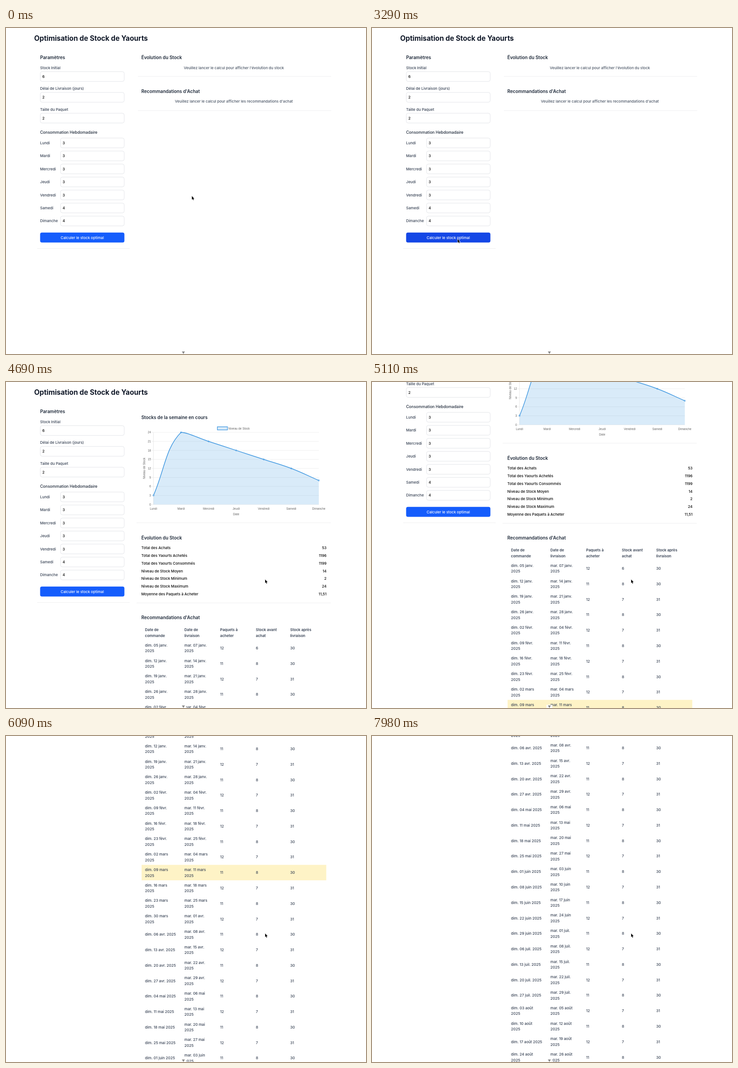
Recreate the animation shown at these times as an HTML page with a canvas. Size 786x712 px, loop 8 s.

```html
<!DOCTYPE html>
<html lang="fr">
<head>
<meta charset="utf-8">
<style>
html, body { margin: 0; width: 100%; height: 100%; overflow: hidden; background: #fff; }
canvas { display: block; }
</style>
</head>
<body>
<canvas id="stage" width="786" height="712"></canvas>
<script>
const ctx = document.getElementById('stage').getContext('2d');
const LOOP = 8000, STEP = 70, RESULT_AT = 3360, CHART_MS = 1000;
const DAYS = ['Lundi', 'Mardi', 'Mercredi', 'Jeudi', 'Vendredi', 'Samedi', 'Dimanche'];
const MONTHS = ['janv.', 'févr.', 'mars', 'avr.', 'mai', 'juin', 'juil.', 'août'];
const STOCK = [3, 24, 21, 18, 15, 12, 8];
const STATS = [
  ['Total des Achats', '53'], ['Total des Yaourts Achetés', '1196'],
  ['Total des Yaourts Consommés', '1199'], ['Niveau de Stock Moyen', '14'],
  ['Niveau de Stock Minimum', '2'], ['Niveau de Stock Maximum', '24'],
  ['Moyenne des Paquets à Acheter', '11,51']
];
const HEADERS = [
  [304, 'Date de', 'commande'], [390, 'Date de', 'livraison'], [468, 'Paquets à', 'acheter'],
  [546, 'Stock avant', 'achat'], [621, 'Stock après', 'livraison']
];
const BODY = 8.05, INK = '#364153', HEAD = '#1e2939', BLUE = '#4299e1', BLUE_FILL = 'rgba(66,153,225,.2)';
const LEFT = 74.5, RIGHT = 258.5;

// Keys are [time, value, slope]; cubic Hermite between them.
const CURSOR_X = [[70, 405.8], [840, 340], [1400, 340], [2520, 196], [2870, 196], [3010, 187], [3430, 187], [4690, 565.8]];
const CURSOR_Y = [[70, 367], [840, 350], [1400, 350], [2520, 459], [2870, 459], [3010, 461], [3430, 461], [4690, 431.3]];
const SCROLL = [[4900, 0, .7], [5460, 424.4, .36], [6090, 586.8, .15], [6860, 648], [7490, 648, .6], [7980, 994, .5]];

function track(keys, t) {
  if (t <= keys[0][0]) return keys[0][1];
  const i = keys.findIndex(k => k[0] >= t);
  if (i < 0) return keys[keys.length - 1][1];
  const [t0, a, m0 = 0] = keys[i - 1], [t1, b, m1 = 0] = keys[i];
  const d = t1 - t0, u = (t - t0) / d, v = 1 - u;
  // Flat stretches stay flat, whatever slope follows them.
  if (a === b) return a;
  return v * v * (1 + 2 * u) * a + u * u * (3 - 2 * u) * b + u * v * d * (v * m0 - u * m1);
}

// y is the middle of the capitals; for left-aligned text x is the edge of the ink.
function text(s, x, y, { size = BODY, weight = 450, color = INK, align = 'left', family = 'Inter' } = {}) {
  ctx.font = `${weight} ${size}px ${family}, sans-serif`;
  ctx.fillStyle = color;
  ctx.textAlign = align;
  ctx.fillText(s, align === 'left' ? x - size * .06 : x, y + size * .36);
}
const heading = (s, x, y) => text(s, x, y, { size: 9.9, weight: 600, color: HEAD });
const small = (s, x, y, align = 'center') =>
  text(s, x, y, { size: 6.4, weight: 400, color: '#666', align, family: 'Liberation Sans' });

function line(x0, y0, x1, y1, color) {
  ctx.strokeStyle = color;
  ctx.lineWidth = .7;
  ctx.beginPath();
  ctx.moveTo(x0, y0);
  ctx.lineTo(x1, y1);
  ctx.stroke();
}
const cardEdge = (x0, x1, y) => line(x0, y, x1, y, '#e9e9ea');

function box(x, y, w, h, fill, stroke) {
  ctx.beginPath();
  ctx.roundRect(x, y, w, h, 4);
  ctx.fillStyle = fill;
  ctx.fill();
  if (!stroke) return;
  ctx.strokeStyle = stroke;
  ctx.lineWidth = .8;
  ctx.stroke();
}
function field(x, y, value) {
  box(x + .4, y - 10.7, RIGHT - x - .8, 21.4, '#fff', '#dcdfe4');
  text(value, x + 5.3, y, { color: '#0a0a0a' });
}

function drawForm(hover) {
  text('Optimisation de Stock de Yaourts', 62.5, 22.5, { size: 15.3, weight: 650, color: '#101828' });
  heading('Paramètres', 75, 64.5);
  [['Stock Initial', 6], ['Délai de Livraison (jours)', 2], ['Taille du Paquet', 2]].forEach(([label, value], i) => {
    text(label, 75, 87 + i * 45.4);
    field(LEFT, 106 + i * 45.4, value);
  });
  text('Consommation Hebdomadaire', 75, 228, { size: 8.65, weight: 550, color: HEAD });
  DAYS.forEach((day, i) => {
    const y = 251 + i * 28.42;
    text(day, 75, y);
    field(118.7, y, i < 5 ? 3 : 4);
  });
  box(LEFT, 446.8, RIGHT - LEFT, 21.6, hover ? '#1447e6' : '#155dfc');
  text('Calculer le stock optimal', 166.5, 458, { weight: 500, color: '#fff', align: 'center' });
  cardEdge(68, 270, 481.5);
}

function drawEmpty() {
  const note = { color: '#4a5565', align: 'center' };
  heading('Évolution du Stock', 296, 64.5);
  text("Veuillez lancer le calcul pour afficher l'évolution du stock", 497.5, 87, note);
  cardEdge(288, 710, 105.8);
  heading("Recommandations d'Achat", 296, 138.5);
  text("Veuillez lancer le calcul pour afficher les recommandations d'achat", 497.5, 160.5, note);
  cardEdge(288, 710, 180.3);
}

function drawChart(progress) {
  const left = 322, right = 683, top = 110, base = 267.5, unit = (base - top) / 24;
  const points = STOCK.map((v, i) => ({ x: left + i * (right - left) / 6, y: base - v * unit * progress }));
  const clamp = y => Math.min(base, Math.max(top, y));

  heading('Stocks de la semaine en cours', 296, 77);
  ctx.fillStyle = BLUE_FILL;
  ctx.fillRect(461.5, 97.8, 22, 6.8);
  ctx.strokeStyle = BLUE;
  ctx.lineWidth = 1.3;
  ctx.strokeRect(461.5, 97.8, 22, 6.8);
  small('Niveau de Stock', 486, 101.3, 'left');

  for (let v = 0; v <= 24; v += 3) {
    const y = base - v * unit;
    line(left - 4, y, right, y, '#e8e8e8');
    small(v, 316.5, y, 'right');
  }
  line(left, top, left, base, '#dedede');
  points.forEach((p, i) => small(DAYS[i], p.x, 277));
  small('Date', 502.5, 288.3);
  ctx.save();
  ctx.translate(302, 188.5);
  ctx.rotate(-Math.PI / 2);
  small('Niveau de Stock', 0, 0);
  ctx.restore();

  // Cardinal spline with tension .4, weighted by chord length.
  const handles = points.map((p, i) => {
    const prev = points[i - 1] || p, next = points[i + 1] || p;
    const a = Math.hypot(p.x - prev.x, p.y - prev.y), b = Math.hypot(next.x - p.x, next.y - p.y);
    const k = .4 / (a + b), dx = next.x - prev.x, dy = next.y - prev.y;
    return [p.x - k * a * dx, clamp(p.y - k * a * dy), p.x + k * b * dx, clamp(p.y + k * b * dy)];
  });
  const curve = new Path2D();
  curve.moveTo(points[0].x, points[0].y);
  for (let i = 1; i < points.length; i++) {
    const [, , x1, y1] = handles[i - 1], [x2, y2] = handles[i];
    curve.bezierCurveTo(x1, y1, x2, y2, points[i].x, points[i].y);
  }
  const area = new Path2D(curve);
  area.lineTo(right, base);
  area.lineTo(left, base);
  ctx.fillStyle = BLUE_FILL;
  ctx.fill(area);
  ctx.strokeStyle = BLUE;
  ctx.lineWidth = 1.5;
  ctx.stroke(curve);
  ctx.lineWidth = .6;
  for (const p of points) {
    ctx.beginPath();
    ctx.arc(p.x, p.y, 1.6, 0, 7);
    ctx.fill();
    ctx.stroke();
  }
  cardEdge(285, 709, 307.5);
}

function drawStats() {
  heading('Évolution du Stock', 296, 340);
  STATS.forEach(([label, value], i) => {
    const y = 362 + i * 16.87;
    text(label, 296, y, { weight: 500, color: '#0a0a0a' });
    text(value, 699.8, y, { weight: 500, color: '#0a0a0a', align: 'right' });
  });
  cardEdge(285, 709, 482.5);
}

function drawDate(x, y, prefix, dayOfYear, oneLine) {
  const date = new Date(Date.UTC(2025, 0, dayOfYear));
  const day = String(date.getUTCDate()).padStart(2, '0'), month = date.getUTCMonth();
  const label = `${prefix} ${day} ${MONTHS[month]}`;
  if (oneLine && (month > 2 && month < 7 || month === 7 && day === '17')) return text(label + ' 2025', x, y);
  text(label, x, y - 6.3);
  text('2025', x, y + 6.3);
}

function drawTable() {
  heading("Recommandations d'Achat", 296, 514.7);
  for (const [x, first, second] of HEADERS) {
    text(first, x, 541.2, { weight: 600 });
    text(second, x, 553.8, { weight: 600 });
  }
  for (let i = 0; i < 34; i++) {
    const y = 581.2 + i * 33.77, odd = i % 2;
    if (i === 9) {
      ctx.fillStyle = '#fef3c6';
      ctx.fillRect(296, y - 16.9, 403.3, 33.77);
    }
    drawDate(304, y, 'dim.', 5 + i * 7, true);
    drawDate(390, y, 'mar.', 7 + i * 7, false);
    text(odd ? 11 : 12, 468, y);
    text(odd ? 8 : i ? 7 : 6, 546, y);
    text(odd || !i ? 30 : 31, 621, y);
  }
}

function drawMarker() {
  ctx.fillStyle = '#fff';
  ctx.fillRect(381, 705, 12.5, 7);
  ctx.fillStyle = '#858585';
  ctx.fill(new Path2D('M384 706.5h6.6l-3.3 5.3z'));
}

function drawCursor(x, y) {
  ctx.save();
  ctx.translate(x, y);
  const arrow = new Path2D('M0 0V7.8L1.7 6.2L2.9 9.1L4.2 8.5L3 5.7H5.3Z');
  ctx.strokeStyle = '#fff';
  ctx.lineWidth = 1.2;
  ctx.stroke(arrow);
  ctx.fillStyle = '#000';
  ctx.fill(arrow);
  ctx.restore();
}

function draw(now) {
  const t = Math.floor(now % LOOP / STEP) * STEP;
  const x = track(CURSOR_X, t), y = track(CURSOR_Y, t), scroll = track(SCROLL, t);
  const hover = x > LEFT && x < RIGHT && y > 447 && y < 468;
  ctx.fillStyle = '#fff';
  ctx.fillRect(0, 0, 786, 712);
  ctx.save();
  ctx.translate(0, -scroll);
  drawForm(hover);
  if (t < RESULT_AT) {
    drawEmpty();
  } else {
    const u = Math.min(1, (t - RESULT_AT) / CHART_MS);
    drawChart(1 - (1 - u) ** 4);
    drawStats();
    drawTable();
  }
  ctx.restore();
  drawMarker();
  drawCursor(x, y);
  requestAnimationFrame(draw);
}
requestAnimationFrame(draw);
</script>
</body>
</html>
```
